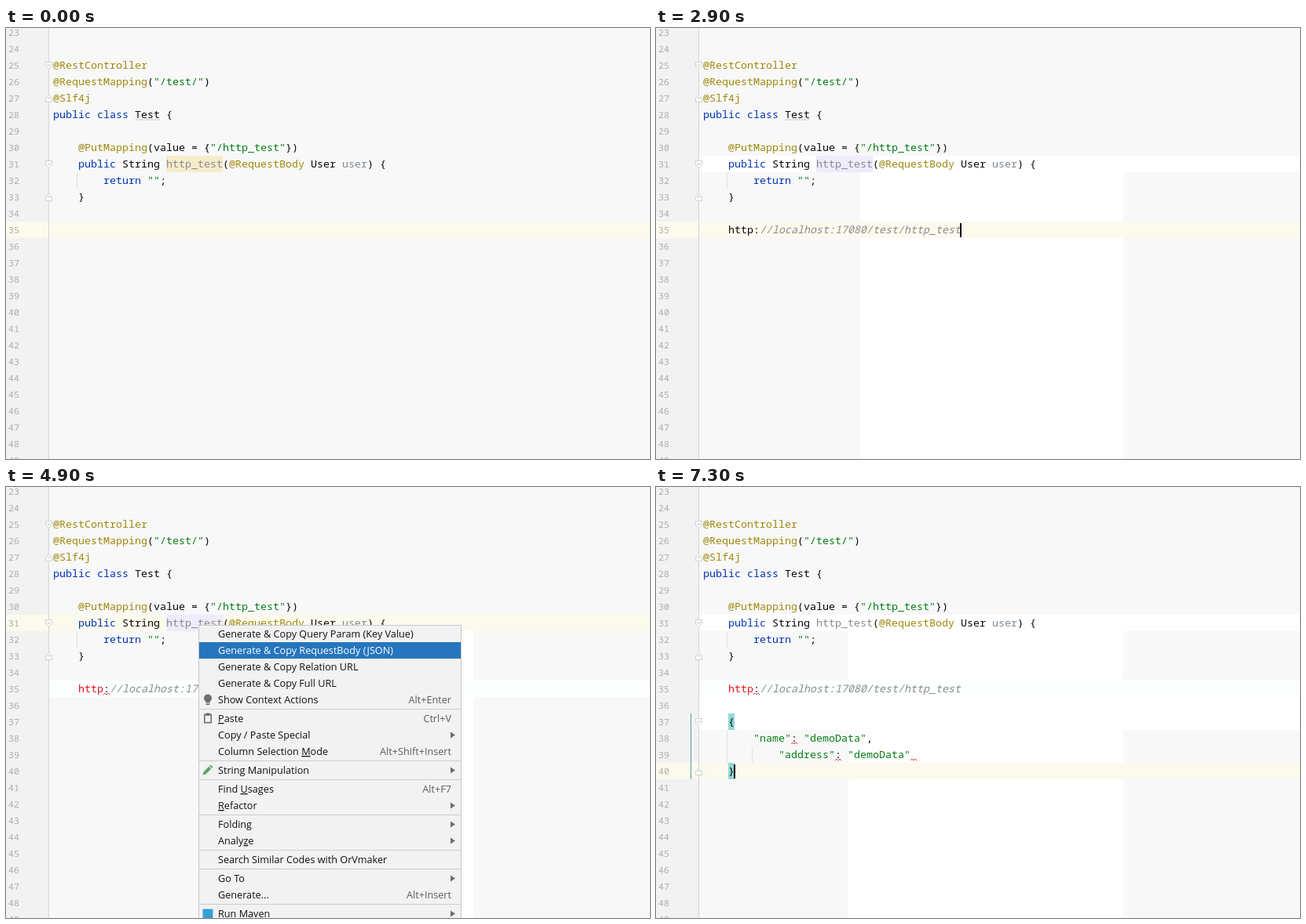
Recreate the animation shown at these times as an HTML page. Size 820 px wide and 550 px high, loop 7.9 s.

```html
<!DOCTYPE html>
<html lang="en">
<head>
<meta charset="utf-8">
<title>Copy a URL and a JSON body from a controller method</title>
<style>
  html, body { margin: 0; width: 100%; height: 100%; overflow: hidden; background: #f8f8f8; }
  svg { display: block; width: 820px; height: 550px; }
  text { white-space: pre; }
  .code { font: 13.333px "Noto Sans Mono", "DejaVu Sans Mono", monospace; fill: #080808; }
  .num { font: 11.667px "Noto Sans Mono", "DejaVu Sans Mono", monospace; fill: #adadad; }
  .menu { font: 12.67px "Open Sans", "Noto Sans", sans-serif; fill: #111; }
  .menu .key { fill: #5c5c5c; text-anchor: end; }
  .menu .picked { fill: #fff; }
  .mnemonic { text-decoration: underline; }
  .ann { fill: #9e880d; }
  .kw { fill: #0033b3; }
  .str { fill: #067d17; }
  .dim { fill: #8a8a8a; }
  .arg { fill: #7c8891; }
  .note { fill: #8c8c8c; font-style: italic; }
  .err { fill: #e8101c; }
</style>
</head>
<body>
<svg id="stage" viewBox="0 0 820 550"></svg>
<script>
const LOOP = 7900;
const YELLOW = '#fcfaed', WHITE = '#fff', TINT = '#fcffff';
const stage = document.getElementById('stage');
const timed = [];

function add(tag, attrs, parent = stage, content) {
  const el = document.createElementNS('http://www.w3.org/2000/svg', tag);
  for (const key in attrs) el.setAttribute(key, attrs[key]);
  if (content !== undefined) el.textContent = content;
  parent.appendChild(el);
  return el;
}

// Shows an element only inside the given [from, to) spans.
function during(el, ...spans) {
  timed.push({ el, spans });
  return el;
}

const group = (...spans) => during(add('g', {}), ...spans);
const rowTop = row => 163 + (row - 31) * 21;
const colX = col => 60 + col * 8;
const rect = (x, y, width, height, fill, parent) =>
  add('rect', { x, y, width, height, fill }, parent);
const line = (d, stroke, parent, width = 1) =>
  add('path', { d, stroke, 'stroke-width': width, fill: 'none' }, parent);

function rowFill(row, color, ...spans) {
  const x = color === YELLOW ? 0 : 55;
  during(rect(x, rowTop(row), 820 - x, 21, color), ...spans);
}

// Tokens are [text, class] pairs laid out on the character grid.
function code(row, col, tokens, parent) {
  const el = add('text', { class: 'code', y: rowTop(row) + 15 }, parent);
  for (const [text, kind = ''] of tokens) {
    add('tspan', { x: colX(col), class: kind }, el, text);
    col += text.length;
  }
}

function wave(x, y, width, color, parent) {
  let d = `M${x} ${y + 2}`;
  for (let i = 2; i <= width; i += 2) d += `L${x + i} ${y + (i % 4 ? 0 : 2)}`;
  line(d, color, parent);
}

function fold(row, closing, parent) {
  const y = rowTop(row) + 11;
  const s = closing ? -1 : 1;
  add('path', {
    d: `M50.5 ${y - 4.5 * s}h8v${5 * s}l-4 ${4 * s}l-4 ${-4 * s}z`,
    fill: '#fafafa', stroke: '#d2d2d2'
  }, parent);
  line(`M52.5 ${y - 0.5}h4`, '#c4c4c4', parent);
}

const guide = (col, from, to, parent) =>
  line(`M${colX(col) - 1.5} ${rowTop(from)}V${rowTop(to + 1)}`, '#e2e2e2', parent);

const caret = (x, row, ...spans) =>
  during(rect(x - 1, rowTop(row) + 2, 2, 18, '#000'), ...spans);

// Backgrounds
rect(0, 0, 820, 550, '#f8f8f8');
rect(0, 0, 54, 550, '#f2f2f2');
during(rect(260, 184, 335, 366, WHITE), [2300, LOOP]);
during(rect(245, 184, 350, 366, WHITE), [5200, LOOP]);

rowFill(31, YELLOW, [400, 2600], [3700, 5500]);
rowFill(31, WHITE, [2600, 3700], [5500, LOOP]);
rowFill(35, YELLOW, [0, 400], [2600, 3700], [5900, 6400]);
rowFill(35, WHITE, [400, 2600]);
rowFill(35, TINT, [3700, 5900], [6400, LOOP]);
rowFill(36, YELLOW, [6400, 6500]);
rowFill(36, WHITE, [6500, LOOP]);
rowFill(37, YELLOW, [5500, 5900], [6500, 6800]);
rowFill(37, WHITE, [5900, 6500], [6800, LOOP]);
rowFill(40, YELLOW, [6800, LOOP]);

during(rect(204, 163, 72, 21, '#f6ebcb'), [0, 1200]);
during(rect(204, 163, 72, 21, '#edebfc'), [1200, 3200], [3800, 5500]);

// Gutter
line('M54.5 0V550', '#d6d6d6');
for (let n = 23; n < 50; n++)
  add('text', { class: 'num', x: 3, y: rowTop(n) + 15 }, stage, n);
[[25, false], [27, true], [31, false], [33, true]].forEach(([row, closing]) => fold(row, closing));
guide(4, 32, 32);

// Class source
code(25, 0, [['@RestController', 'ann']]);
code(26, 0, [['@RequestMapping', 'ann'], ['('], ['"/test/"', 'str'], [')']]);
code(27, 0, [['@Slf4j', 'ann']]);
code(28, 0, [['public class ', 'kw'], ['Test {']]);
code(30, 4, [['@PutMapping', 'ann'], ['(value = {'], ['"/http_test"', 'str'], ['})']]);
code(31, 4, [['public ', 'kw'], ['String '], ['http_test', 'dim'], ['('],
  ['@RequestBody', 'ann'], [' User '], ['user', 'arg'], [') {']]);
code(32, 8, [['return ', 'kw'], ['""', 'str'], [';']]);
code(33, 4, [['}']]);
wave(164, 116, 32, '#c9c9c9', group([0, 3200]));

// Pasted URL
const url = '//localhost:17080/test/http_test';
code(35, 4, [['http:'], [url, 'note']], group([2900, 3200]));
const checkedUrl = group([3200, LOOP]);
code(35, 4, [['http', 'err'], [':'], [url, 'note']], checkedUrl);
wave(124, 263, 8, '#e8404a', checkedUrl);

// Pasted JSON
const json = group([6800, LOOP]);
line(`M44.5 ${rowTop(37)}V${rowTop(41)}`, '#4f9f98', json);
for (const row of [37, 40]) rect(92, rowTop(row), 8, 21, '#93d9d9', json);
code(37, 4, [['{']], json);
code(38, 8, [['"name"', 'str'], [': '], ['"demoData"', 'str'], [',']], json);
code(39, 12, [['"address"', 'str'], [': '], ['"demoData"', 'str']], json);
code(40, 4, [['}']], json);

const errors = group([7200, LOOP]);
for (const [x, row] of [[172, 38], [228, 39], [324, 39]])
  wave(x, rowTop(row) + 16, 8, '#e8404a', errors);

const structure = group([7300, LOOP]);
fold(37, false, structure);
fold(40, true, structure);
guide(4, 38, 39, structure);
guide(8, 39, 39, structure);

caret(356, 31, [400, 1200]);
caret(260, 31, [1200, 1600], [2400, 2600]);
caret(92, 35, [2600, 2900]);
caret(388, 35, [2900, 3700], [5900, 6400]);
caret(244, 31, [3700, 4200], [5200, 5500]);
caret(60, 37, [5500, 5900]);
caret(92, 36, [6400, 6500]);
caret(92, 37, [6500, 6800]);
caret(100, 40, [6800, LOOP]);

// Context menu: '_' marks the mnemonic, '>' a submenu, null a separator.
const ITEMS = [
  ['Generate & Copy Query Param (Key Value)'],
  ['Generate & Copy RequestBody (JSON)'],
  ['Generate & Copy Relation URL'],
  ['Generate & Copy Full URL'],
  ['Show Context Actions', 'Alt+Enter', 'bulb'],
  null,
  ['_Paste', 'Ctrl+V', 'clip'],
  ['Copy / Paste Special', '>'],
  ['Column Selection _Mode', 'Alt+Shift+Insert'],
  null,
  ['String Manipulation', '>', 'pencil'],
  null,
  ['Find _Usages', 'Alt+F7'],
  ['_Refactor', '>'],
  null,
  ['Folding', '>'],
  ['Analy_ze', '>'],
  null,
  ['Search Similar Codes with OrVmaker'],
  null,
  ['Go To', '>'],
  ['Generate...', 'Alt+Insert'],
  null,
  ['Run Maven', '>', 'block']
];

const ICONS = {
  bulb(g) {
    add('circle', { cx: 12, cy: 8.5, r: 5, fill: '#6e6e6e' }, g);
    rect(9.5, 11, 5, 3.5, '#6e6e6e', g);
    rect(9.5, 15.5, 5, 1.5, '#6e6e6e', g);
  },
  clip(g) {
    add('rect', { x: 7.8, y: 5.3, width: 8.4, height: 10.4, fill: 'none',
      stroke: '#6e6e6e', 'stroke-width': 1.6 }, g);
    rect(9.5, 3.5, 5, 3.5, '#6e6e6e', g);
  },
  pencil(g) {
    add('path', { d: 'M5.5 16.5l1-4 6.7-6.7 3 3-6.7 6.7zM14 5l1.5-1.5 3 3-1.5 1.5z', fill: '#59a869' }, g);
  },
  block(g) { rect(5.5, 4.5, 13, 13, '#389fd6', g); }
};

function label(text, y, g) {
  const el = add('text', { x: 25, y: y + 15 }, g);
  const at = text.indexOf('_');
  if (at < 0) { el.textContent = text; return; }
  add('tspan', {}, el, text.slice(0, at));
  add('tspan', { class: 'mnemonic' }, el, text[at + 1]);
  add('tspan', {}, el, text.slice(at + 2));
}

function menu(x, y, span, picks) {
  const g = group(span);
  g.setAttribute('class', 'menu');
  g.setAttribute('transform', `translate(${x} ${y})`);
  add('rect', { x: 0.5, y: 0.5, width: 334, height: 400, fill: '#f2f2f2', stroke: '#c8c8c8' }, g);
  let top = 1;
  for (const item of ITEMS) {
    if (!item) {
      line(`M1 ${top + 1.5}H334`, '#cdcdcd', g);
      top += 3;
      continue;
    }
    const [text, extra, icon] = item;
    label(text, top, g);
    if (extra === '>')
      add('path', { d: `M321 ${top + 6.5}l6 4-6 4z`, fill: '#6e6e6e' }, g);
    else if (extra)
      add('text', { class: 'key', x: 322, y: top + 15 }, g, extra);
    if (icon) ICONS[icon](add('g', { transform: `translate(0 ${top})` }, g));
    top += 21;
  }
  for (const [index, from, to] of picks) {
    const pick = during(add('g', { class: 'picked' }, g), [from, to]);
    rect(1, 1 + index * 21, 333, 21, '#2675bf', pick);
    label(ITEMS[index][0], 1 + index * 21, pick);
  }
}

menu(260, 172, [1600, 2300], [[1, 1800, 2000], [2, 2000, 2100], [3, 2100, 2300]]);
menu(245, 176, [4200, 5200],
  [[1, 4400, 4500], [3, 4500, 4800], [2, 4800, 4900], [1, 4900, 5200]]);

function draw() {
  const t = performance.now() % LOOP;
  for (const { el, spans } of timed) {
    const shown = spans.some(([from, to]) => t >= from && t < to);
    el.style.display = shown ? '' : 'none';
  }
  requestAnimationFrame(draw);
}
draw();
</script>
</body>
</html>
```
